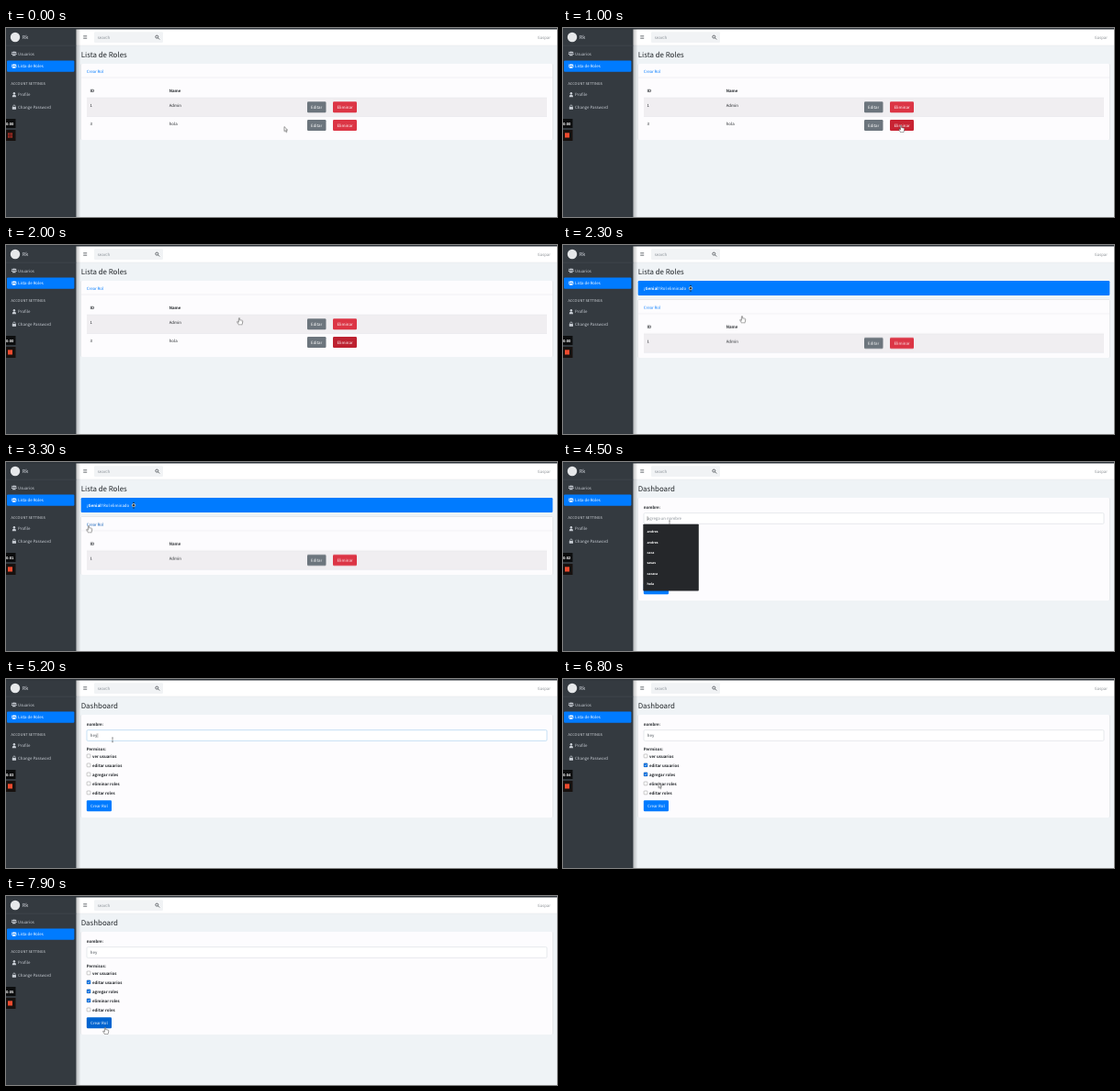
An HTML page that plays this animation: 600 px wide and 206 px high, repeating every 8 s.

```html
<!DOCTYPE html>
<html lang="es">
<head>
<meta charset="utf-8">
<title>Lista de Roles</title>
<style>
html, body { margin: 0; width: 100%; height: 100%; overflow: hidden; background: #eff3f6; }
#stage { display: block; width: 600px; height: 206px; }
text {
  font: 4.38px "Noto Sans CJK JP", "Noto Sans CJK SC", "Noto Sans CJK", "Open Sans", sans-serif;
  fill: #212529; text-rendering: geometricPrecision;
}
.title { font-size: 7.9px; }
.brand { font-size: 5.5px; fill: #d3d7dd; }
.bold { font-weight: 700; }
.side { fill: #c9ced5; }
.head { font-size: 3.95px; fill: #d0d4d9; }
.white { fill: #fff; }
.mid { text-anchor: middle; }
.end { text-anchor: end; fill: #8f9499; }
.hint { fill: #858c93; }
.entry { fill: #495057; }
.link { fill: #007bff; }
.suggest text { font: 700 3.5px "Noto Sans", "Open Sans", sans-serif; fill: #fff; }
.clock text { font: 700 4.2px "Liberation Sans", Arial, sans-serif; fill: #fff; }
.card { fill: #fdfcfe; filter: drop-shadow(0 .3px .5px #0004); }
.rule { stroke: #dfe1e5; stroke-width: .4; fill: none; }

/* One shared 8 s timeline: 1% = 80 ms */
.on { animation: 8s step-end infinite; }
.list { animation-name: list; }
.before { animation-name: before; }
.after { animation-name: after; }
.shift { animation-name: shift; }
.danger { animation-name: danger; }
.hover { animation-name: hover; }
.dash { animation-name: dash; }
.suggest { animation-name: suggest; }
.blank { animation-name: blank; }
.field { animation-name: field; }
.kh { animation-name: kh; }
.ke { animation-name: ke; }
.ky { animation-name: ky; }
.caret { animation-name: caret; }
.c1 { animation-name: c1; }
.c2 { animation-name: c2; }
.c3 { animation-name: c3; }
.save { animation-name: save; }
.ready { animation-name: ready; }
.live { animation-name: live; }
.tick { animation-name: tick; }
.arrow { animation-name: arrow; }
.hand { animation-name: hand; }
.beam { animation-name: beam; }
.pointer { animation: path 8s ease-in-out infinite; }

@keyframes list { 0% { opacity: 1 } 46.25%, 100% { opacity: 0 } }
@keyframes before { 0% { opacity: 1 } 28.75%, 100% { opacity: 0 } }
@keyframes after { 0% { opacity: 0 } 28.75%, 100% { opacity: 1 } }
@keyframes shift { 0% { transform: none } 28.75%, 100% { transform: translateY(20.7px) } }
@keyframes danger { 0% { fill: #dc3545 } 8.75% { fill: #c82333 } 13.75%, 100% { fill: #bd2130 } }
@keyframes hover { 0% { fill: #007bff } 35%, 100% { fill: #0056b3 } }
@keyframes dash { 0% { opacity: 0 } 46.25%, 100% { opacity: 1 } }
@keyframes suggest { 0% { opacity: 0 } 55% { opacity: 1 } 58.75%, 100% { opacity: 0 } }
@keyframes blank { 0% { opacity: 1 } 58.75%, 100% { opacity: 0 } }
@keyframes field { 0% { stroke: #ced4da } 57% { stroke: #8fc3e8 } 73.75%, 100% { stroke: #ced4da } }
@keyframes kh { 0% { fill-opacity: 0 } 58.75%, 100% { fill-opacity: 1 } }
@keyframes ke { 0% { fill-opacity: 0 } 60.6%, 100% { fill-opacity: 1 } }
@keyframes ky { 0% { fill-opacity: 0 } 62.5%, 100% { fill-opacity: 1 } }
@keyframes caret {
  0% { opacity: 0; transform: none }
  55% { opacity: 1; transform: none }
  58.75% { opacity: 1; transform: translateX(2.7px) }
  60.6% { opacity: 1; transform: translateX(5.1px) }
  62.5% { opacity: 1; transform: translateX(7.5px) }
  68.75% { opacity: 0; transform: translateX(7.5px) }
  73.75%, 100% { opacity: 0; transform: none }
}
@keyframes c1 { 0% { opacity: 0 } 73.75%, 100% { opacity: 1 } }
@keyframes c2 { 0% { opacity: 0 } 80%, 100% { opacity: 1 } }
@keyframes c3 { 0% { opacity: 0 } 90%, 100% { opacity: 1 } }
@keyframes save { 0% { fill: #007bff } 95%, 100% { fill: #0064d0 } }
@keyframes ready { 0% { opacity: 1 } 8%, 100% { opacity: 0 } }
@keyframes live { 0% { opacity: 0 } 8%, 100% { opacity: 1 } }
@keyframes tick {
  0% { transform: none }
  37.5% { transform: translateY(-6px) }
  50% { transform: translateY(-12px) }
  62.5% { transform: translateY(-18px) }
  75% { transform: translateY(-24px) }
  87.5%, 100% { transform: translateY(-30px) }
}
@keyframes arrow { 0% { opacity: 1 } 8.75% { opacity: 0 } 46.25% { opacity: 1 } 50% { opacity: 0 } 67.5% { opacity: 1 } 95%, 100% { opacity: 0 } }
@keyframes hand { 0% { opacity: 0 } 8.75% { opacity: 1 } 46.25% { opacity: 0 } 95%, 100% { opacity: 1 } }
@keyframes beam { 0% { opacity: 0 } 50% { opacity: 1 } 67.5%, 100% { opacity: 0 } }
@keyframes path {
  0%, 1.25% { transform: translate(303px, 107.5px) }
  10%, 17.5% { transform: translate(368px, 106px) }
  25% { transform: translate(254px, 79.3px) }
  33.75% { transform: translate(99px, 74px) }
  40%, 46.25% { transform: translate(90px, 69.3px) }
  52.5%, 66% { transform: translate(116px, 66px) }
  70% { transform: translate(150px, 84px) }
  73.5%, 74.5% { transform: translate(112px, 94px) }
  79%, 80.5% { transform: translate(110px, 104px) }
  82.5% { transform: translate(128px, 124px) }
  85%, 90.5% { transform: translate(104px, 113.5px) }
  97%, 100% { transform: translate(108px, 143px) }
}
</style>
</head>
<body>
<svg id="stage" viewBox="0 0 600 206">
  <defs>
    <linearGradient id="shade">
      <stop stop-color="#000" stop-opacity=".22"/>
      <stop offset="1" stop-color="#000" stop-opacity="0"/>
    </linearGradient>
    <g id="users">
      <circle cx="1.2" cy="1.3" r=".8"/><circle cx="4.8" cy="1.3" r=".8"/>
      <circle cx="3" cy="1.4" r="1.15"/>
      <path d="M0 3.7q0-1.4 1.2-1.4l.6.3-.7 1.1zM6 3.7q0-1.4-1.2-1.4l-.6.3.7 1.1zM1.1 4.9q0-2 1.9-2t1.9 2z"/>
    </g>
    <g id="edit">
      <rect x="328" width="20.5" height="12" rx="1.2" fill="#6c757d"/>
      <text class="white mid" x="338.2" y="7.6">Editar</text>
    </g>
    <rect id="box" x="88.1" y="-2" width="3.8" height="3.8" rx=".6" fill="#fff" stroke="#767676" stroke-width=".4"/>
    <g id="check">
      <rect x="87.9" y="-2.2" width="4.2" height="4.2" rx=".6" fill="#0b6fdc"/>
      <path d="M88.8-.1l.9.9 1.6-1.9" fill="none" stroke="#fff" stroke-width=".6"/>
    </g>
  </defs>

  <rect width="600" height="206" fill="#eff3f6"/>

  <!-- Top bar -->
  <rect x="76" y="1" width="524" height="18" fill="#fff"/>
  <path class="rule" d="M76 19H600"/>
  <path d="M84.2 8.5h4M84.2 10h4M84.2 11.5h4" stroke="#666b70" stroke-width=".65"/>
  <rect x="96" y="4.2" width="75" height="11.8" rx="1.2" fill="#f1f3f5"/>
  <text class="hint" x="99.8" y="11.7">search</text>
  <g fill="none" stroke="#43484d" stroke-width=".8"><circle cx="164.3" cy="9.6" r="1.5"/><path d="M165.4 10.7l1.8 1.8"/></g>
  <text class="end" x="593" y="11.7">Gaspar</text>

  <!-- Role list -->
  <g class="on list">
    <text class="title" x="81.7" y="32.2">Lista de Roles</text>
    <g class="on after">
      <rect x="81.7" y="39" width="513.6" height="16" rx="1.2" fill="#007bff"/>
      <text class="white" x="88" y="48.8"><tspan class="bold">¡Genial!</tspan> Rol eliminado</text>
      <circle cx="139" cy="47.2" r="1.7" fill="#33383d" stroke="#e9e3d5" stroke-width=".7"/>
      <path d="M138 44.4h2M138 50h2" stroke="#222" stroke-width=".8"/>
    </g>
    <rect class="card on before" x="81.7" y="39" width="513.6" height="83" rx="1.2"/>
    <rect class="card on after" x="81.7" y="59.5" width="513.6" height="63.5" rx="1.2"/>
    <g class="on shift">
      <text class="link on hover" x="87.7" y="48.5">Crear Rol</text>
      <path class="rule" d="M82 54H595"/>
      <text class="bold" x="91.5" y="70.3">ID</text>
      <text class="bold" x="177.7" y="70.3">Name</text>
      <rect x="88" y="76" width="501" height="20.5" fill="#f0eef1"/>
      <path class="rule" d="M88 76H589M88 96.5H589"/>
      <text x="91.5" y="86">1</text>
      <text x="177.7" y="86">Admin</text>
      <use href="#edit" y="80.2"/>
      <rect x="356" y="80.2" width="26" height="12" rx="1.2" fill="#dc3545"/>
      <text class="white mid" x="369" y="87.8">Eliminar</text>
    </g>
    <g class="on before">
      <text x="91.5" y="105.6">3</text>
      <text x="177.7" y="105.6">hola</text>
      <use href="#edit" y="100"/>
      <rect class="on danger" x="356" y="100" width="26" height="12" rx="1.2"/>
      <text class="white mid" x="369" y="107.6">Eliminar</text>
    </g>
  </g>

  <!-- New role form -->
  <g class="on dash">
    <text class="title" x="81.7" y="32.2">Dashboard</text>
    <rect class="card" x="81.7" y="39" width="513.6" height="112" rx="1.2"/>
    <text class="bold" x="87.7" y="51">nombre:</text>
    <rect class="on field" x="88" y="55.6" width="501" height="11.8" rx="1.2" fill="#fff" stroke-width=".5"/>
    <text class="hint on blank" x="91.8" y="63.1">agrega un nombre</text>
    <text class="entry" x="91.8" y="63.1"><tspan class="on kh">h</tspan><tspan class="on ke">e</tspan><tspan class="on ky">y</tspan></text>
    <path class="on caret" d="M92 59.2v4.8" stroke="#222" stroke-width=".4"/>
    <text class="bold" x="87.7" y="77.7">Permisos:</text>
    <use href="#box" y="84"/><text class="bold" x="94" y="85.6">ver usuarios</text>
    <use href="#box" y="94"/><text class="bold" x="94" y="95.6">editar usuarios</text>
    <use href="#box" y="104"/><text class="bold" x="94" y="105.6">agregar roles</text>
    <use href="#box" y="114"/><text class="bold" x="94" y="115.6">eliminar roles</text>
    <use href="#box" y="124"/><text class="bold" x="94" y="125.6">editar roles</text>
    <use class="on c1" href="#check" y="94"/>
    <use class="on c2" href="#check" y="104"/>
    <use class="on c3" href="#check" y="114"/>
    <rect class="on save" x="87.8" y="132.3" width="27.2" height="12" rx="1.2"/>
    <text class="white mid" x="101.4" y="140">Crear Rol</text>
    <g class="on suggest">
      <rect x="87.3" y="67.8" width="60.5" height="72.7" rx=".8" fill="#25272a"/>
      <text x="91.5" y="77.4">andres</text>
      <text x="91.5" y="88.7">andres</text>
      <text x="91.5" y="100">caca</text>
      <text x="91.5" y="111.3">sasas</text>
      <text x="91.5" y="122.6">cacaca</text>
      <text x="91.5" y="133.9">hola</text>
    </g>
  </g>

  <!-- Sidebar -->
  <rect x="76.5" y="1" width="5" height="205" fill="url(#shade)"/>
  <rect width="76.5" height="206" fill="#343a40"/>
  <rect width="600" height="1.5" fill="#2f353b"/>
  <circle cx="10" cy="10" r="5.2" fill="#e6e8ea"/>
  <text class="brand" x="17.7" y="12">Rk</text>
  <path d="M0 19.2h76.5" stroke="#4b545c" stroke-width=".4"/>
  <use href="#users" x="5.8" y="25.3" fill="#c9ced5"/>
  <text class="side" x="13" y="29.6">Usuarios</text>
  <rect x="1" y="35.4" width="73.4" height="12.4" rx="1.2" fill="#007bff"/>
  <use href="#users" x="5.8" y="38.9" fill="#fff"/>
  <text class="white" x="13" y="43.3">Lista de Roles</text>
  <text class="head" x="5.5" y="61.8">ACCOUNT SETTINGS</text>
  <g fill="#c9ced5">
    <circle cx="8.9" cy="71.3" r="1.25"/><path d="M6.7 75.2q0-2.6 2.2-2.6t2.2 2.6z"/>
    <rect x="6.8" y="85.9" width="4.2" height="2.9" rx=".5"/>
    <path d="M7.7 86v-.8a1.2 1.2 0 0 1 2.4 0v.8" fill="none" stroke="#c9ced5" stroke-width=".7"/>
  </g>
  <text class="side" x="13" y="74.4">Profile</text>
  <text class="side" x="13" y="87.8">Change Password</text>

  <!-- Recorder -->
  <g class="clock">
    <rect y="99" width="10.5" height="10" fill="#0c0d0e"/>
    <text x="0" y="105.7">0:0</text>
    <svg x="6.1" y="101.2" width="4" height="6">
      <g class="on tick">
        <text y="4.5">0</text><text y="10.5">1</text><text y="16.5">2</text>
        <text y="22.5">3</text><text y="28.5">4</text><text y="34.5">5</text>
      </g>
    </svg>
    <rect y="111" width="10.5" height="12" fill="#17110f"/>
    <g class="on ready">
      <rect x="2" y="114.3" width="5" height="5.4" fill="#a92f25"/>
      <path d="M3.7 114.3v5.4M5.3 114.3v5.4M2 117h5" stroke="#2c1210" stroke-width=".5"/>
    </g>
    <rect class="on live" x="2" y="114.3" width="5" height="5.2" fill="#ee4b2f"/>
  </g>

  <!-- Pointer -->
  <g class="pointer" fill="#fff" stroke="#222" stroke-width=".45" stroke-linejoin="round">
    <path class="on arrow" d="M0 0v5.2l1.2-1.1.9 2 .9-.4-.9-1.9h1.6z"/>
    <path class="on hand" d="M-.6.6q.6-1 1.2 0v2l2.6.5q.7.2.6 1l-.5 2.6-.4 1H-.4L-2.2 5q-.4-.9.4-.9l1.2.9z"/>
    <path class="on beam" d="M-.9-2.2q.9 0 .9.5.0-.5.9-.5M0-1.7v4M-.9 2.8q.9 0 .9-.5 0 .5.9.5" fill="none" stroke="#333"/>
  </g>
</svg>
</body>
</html>
```
